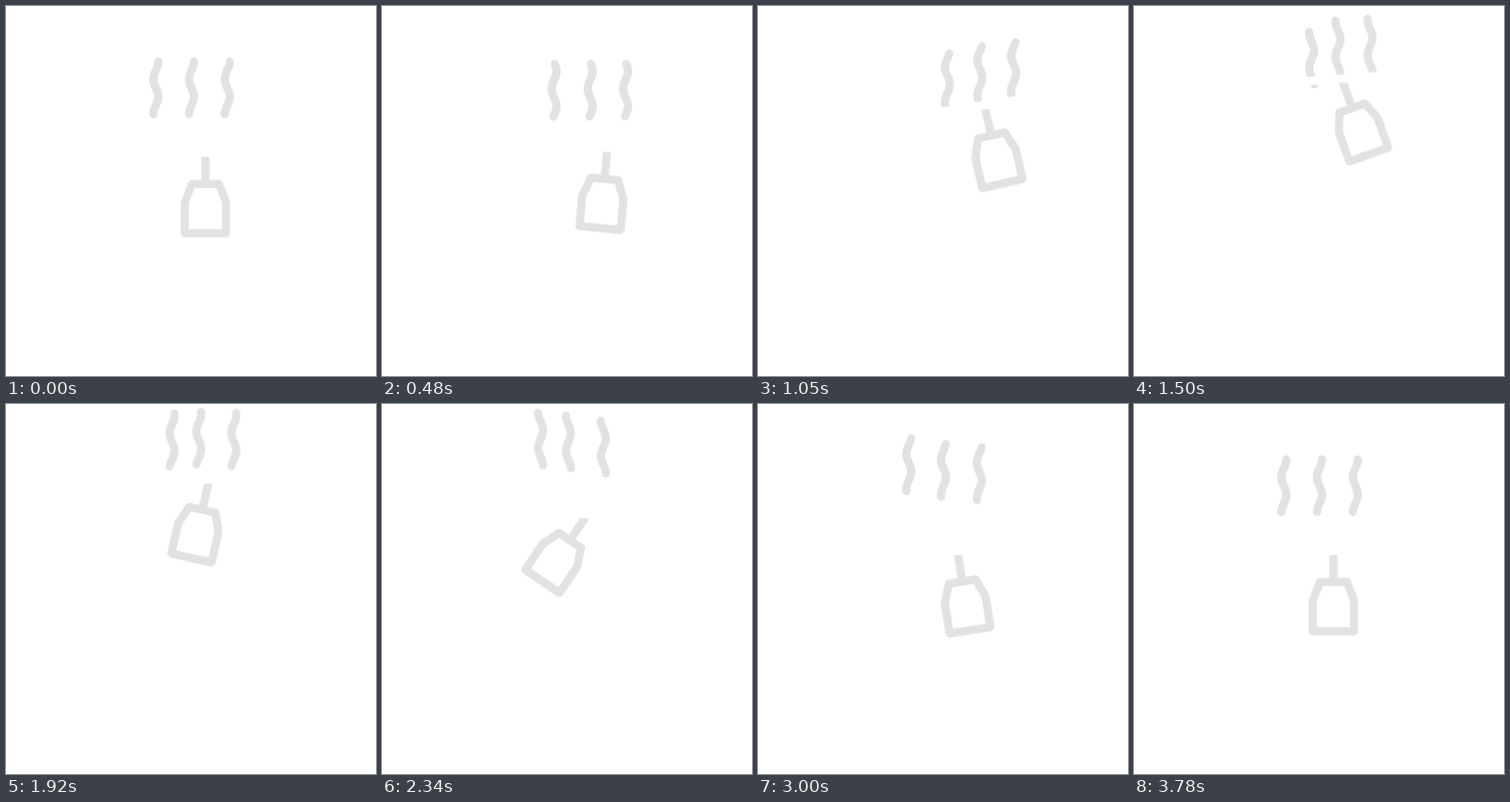
These frames come from a looping animation (400x400 px, 5.87 s). An HTML page without scripts:

```html
<!DOCTYPE html>
<html lang="en">
<head>
<meta charset="utf-8">
<title>Tea</title>
<style>
html, body { margin: 0; width: 100%; height: 100%; overflow: hidden; background: #fff; }
svg { display: block; width: 100%; height: 100%; fill: none; stroke: #e2e2e2; stroke-width: 8.8; stroke-linejoin: round; }
svg [class] { animation: 5.87s ease-in-out infinite; }
use { stroke-linecap: round; stroke-dasharray: 57 400; stroke-dashoffset: -114; }

svg .wave { animation-name: wave; }
svg .x1 { animation-name: x1; }
svg .y1 { animation-name: y1; }
svg .x2 { animation-name: x2; }
svg .y2 { animation-name: y2; }
svg .x3 { animation-name: x3; }
svg .y3 { animation-name: y3; }
svg .cup-x { animation-name: cup-x; }
svg .cup-y { animation-name: cup-y; }
svg .swing { animation-name: swing; }
svg .tilt { animation-name: tilt; }

/* the ripple runs three periods while the visible dash stays in place */
@keyframes wave {
  0%, 1.02% { transform: translateY(0); stroke-dashoffset: -114; animation-timing-function: cubic-bezier(.33,0,.67,.37); }
  8.18% { transform: translateY(8px); stroke-dashoffset: -106; animation-timing-function: cubic-bezier(.33,.26,.67,.63); }
  17.89% { transform: translateY(34px); stroke-dashoffset: -80; animation-timing-function: linear; }
  25.55% { transform: translateY(58px); stroke-dashoffset: -56; animation-timing-function: cubic-bezier(.33,.39,.67,.73); }
  39.86% { transform: translateY(95px); stroke-dashoffset: -19; animation-timing-function: cubic-bezier(.33,.47,.67,.87); }
  51.11% { transform: translateY(112px); stroke-dashoffset: -2; animation-timing-function: cubic-bezier(.33,1,.67,1); }
  61.33%, 100% { transform: translateY(114px); stroke-dashoffset: 0; }
}

/* left steam */
@keyframes x1 {
  0%, 1.02% { transform: translateX(0); animation-timing-function: cubic-bezier(.33,0,.67,.62); }
  8.18% { transform: translateX(24px); animation-timing-function: cubic-bezier(.33,.53,.67,1); }
  16.18% { transform: translateX(43.5px); animation-timing-function: cubic-bezier(.33,0,.67,.61); }
  25.55% { transform: translateX(30px); animation-timing-function: linear; }
  31.18% { transform: translateX(20px); animation-timing-function: cubic-bezier(.33,.47,.67,.72); }
  39.86% { transform: translateX(9.5px); animation-timing-function: cubic-bezier(.33,.44,.67,.9); }
  51.11% { transform: translateX(1px); animation-timing-function: ease-out; }
  61.33%, 100% { transform: translateX(0); }
}
@keyframes y1 {
  0%, 1.02% { transform: translateY(0); }
  8.86% { transform: translateY(2.6px); animation-timing-function: cubic-bezier(.33,0,.67,.27); }
  17.89% { transform: translateY(-9px); animation-timing-function: linear; }
  25.55% { transform: translateY(-32px); animation-timing-function: cubic-bezier(.33,.5,.67,1); }
  36.63% { transform: translateY(-53px); animation-timing-function: cubic-bezier(.33,0,.67,.34); }
  39.86% { transform: translateY(-50.5px); animation-timing-function: cubic-bezier(.33,.21,.67,.57); }
  51.11% { transform: translateY(-23px); animation-timing-function: cubic-bezier(.33,.47,.67,1); }
  61.33%, 100% { transform: translateY(0); }
}

/* middle steam */
@keyframes x2 {
  0%, 1.02% { transform: translateX(0); animation-timing-function: cubic-bezier(.33,0,.67,.61); }
  8.18% { transform: translateX(24.5px); animation-timing-function: cubic-bezier(.33,.52,.67,1); }
  14.99% { transform: translateX(42px); animation-timing-function: cubic-bezier(.33,0,.67,.62); }
  25.55% { transform: translateX(20px); animation-timing-function: cubic-bezier(.33,.44,.67,.73); }
  31.18% { transform: translateX(10px); animation-timing-function: cubic-bezier(.33,.45,.67,.85); }
  39.86% { transform: translateX(1px); animation-timing-function: ease-out; }
  46%, 100% { transform: translateX(0); }
}
@keyframes y2 {
  0%, 1.02% { transform: translateY(0); }
  7.84% { transform: translateY(2.5px); animation-timing-function: cubic-bezier(.33,0,.67,.3); }
  17.89% { transform: translateY(-16.5px); animation-timing-function: cubic-bezier(.33,.37,.67,.78); }
  25.55% { transform: translateY(-44px); animation-timing-function: cubic-bezier(.33,.62,.67,1); }
  31.52% { transform: translateY(-51.5px); animation-timing-function: cubic-bezier(.33,0,.67,.11); }
  39.86% { transform: translateY(-47.5px); animation-timing-function: cubic-bezier(.33,.16,.67,.67); }
  51.11% { transform: translateY(-17px); animation-timing-function: cubic-bezier(.33,.54,.67,1); }
  61.33%, 100% { transform: translateY(0); }
}

/* right steam */
@keyframes x3 {
  0%, 1.02% { transform: translateX(0); animation-timing-function: cubic-bezier(.33,0,.67,.58); }
  8.18% { transform: translateX(24px); animation-timing-function: cubic-bezier(.33,.48,.67,1); }
  14.31% { transform: translateX(41.5px); animation-timing-function: cubic-bezier(.33,0,.67,.66); }
  25.55% { transform: translateX(16px); animation-timing-function: cubic-bezier(.33,.6,.67,.7); }
  31.18% { transform: translateX(9px); animation-timing-function: cubic-bezier(.33,.36,.67,.94); }
  39.86%, 100% { transform: translateX(0); }
}
@keyframes y3 {
  0%, 1.02% { transform: translateY(0); }
  7.67% { transform: translateY(2.5px); animation-timing-function: cubic-bezier(.33,0,.67,.34); }
  17.89% { transform: translateY(-21px); animation-timing-function: cubic-bezier(.33,.47,.67,.82); }
  25.55% { transform: translateY(-46px); animation-timing-function: cubic-bezier(.33,.56,.67,1); }
  29.81% { transform: translateY(-50.5px); animation-timing-function: cubic-bezier(.33,0,.67,.26); }
  39.86% { transform: translateY(-42px); animation-timing-function: cubic-bezier(.33,.25,.67,.72); }
  51.11% { transform: translateY(-13.5px); animation-timing-function: cubic-bezier(.33,.53,.67,1); }
  61.33%, 100% { transform: translateY(0); }
}

/* cup and tea tag */
@keyframes cup-x {
  0%, 1.02% { transform: translateX(0); animation-timing-function: cubic-bezier(.33,0,.67,.69); }
  8.18% { transform: translateX(28px); animation-timing-function: cubic-bezier(.33,.62,.67,1); }
  13.29% { transform: translateX(38px); animation-timing-function: cubic-bezier(.33,0,.67,.57); }
  17.89% { transform: translateX(29px); animation-timing-function: cubic-bezier(.33,.32,.67,.76); }
  25.55% { transform: translateX(9px); animation-timing-function: cubic-bezier(.33,.75,.67,1); }
  31.52% { transform: translateX(4px); }
  39.86% { transform: translateX(6.4px); }
  49.4%, 100% { transform: translateX(0); }
}
@keyframes cup-y {
  0%, 1.02% { transform: translateY(0); animation-timing-function: cubic-bezier(.33,0,.67,.08); }
  8.18% { transform: translateY(-5.3px); animation-timing-function: cubic-bezier(.33,.14,.67,.65); }
  17.89% { transform: translateY(-51.4px); animation-timing-function: cubic-bezier(.33,.45,.67,.78); }
  25.55% { transform: translateY(-80px); animation-timing-function: cubic-bezier(.33,.7,.67,1); }
  28.96% { transform: translateY(-84px); animation-timing-function: cubic-bezier(.33,0,.67,.48); }
  39.86% { transform: translateY(-39.3px); animation-timing-function: cubic-bezier(.33,.48,.67,1); }
  48.55%, 100% { transform: translateY(0); }
}
@keyframes swing {
  0%, 1.02% { transform: rotate(0deg); }
  5.96% { transform: rotate(6.5deg); animation-timing-function: cubic-bezier(.33,0,.67,.33); }
  8.18% { transform: rotate(5.2deg); animation-timing-function: cubic-bezier(.33,.21,.67,.53); }
  17.89% { transform: rotate(-13.1deg); animation-timing-function: cubic-bezier(.33,.49,.67,1); }
  23% { transform: rotate(-22.3deg); animation-timing-function: cubic-bezier(.33,0,.67,.23); }
  25.55% { transform: rotate(-19.7deg); animation-timing-function: cubic-bezier(.33,.2,.67,1); }
  39.35% { transform: rotate(34.2deg); animation-timing-function: cubic-bezier(.33,0,.67,1); }
  51.28% { transform: rotate(-9deg); }
  60.65% { transform: rotate(1.6deg); }
  64.4%, 100% { transform: rotate(0deg); }
}
@keyframes tilt {
  0%, 1.02% { transform: rotate(0deg); }
  8.18% { transform: rotate(5deg); }
  17.89% { transform: rotate(-8.7deg); }
  25.55% { transform: rotate(-4deg); }
  39.86% { transform: rotate(10deg); }
  49.4%, 100% { transform: rotate(0deg); }
}
</style>
</head>
<body>
<svg viewBox="0 0 400 400">
  <defs>
    <path id="ripple" pathLength="171" d="M164.7-54c0 8-5.4 11-5.4 19s5.4 11 5.4 19-5.4 11-5.4 19 5.4 11 5.4 19-5.4 11-5.4 19 5.4 11 5.4 19-5.4 11-5.4 19 5.4 11 5.4 19-5.4 11-5.4 19"/>
  </defs>
  <g class="x1"><g class="y1"><use class="wave" href="#ripple"/></g></g>
  <g class="x2"><g class="y2"><use class="wave" href="#ripple" x="38.5"/></g></g>
  <g class="x3"><g class="y3"><use class="wave" href="#ripple" x="77.2"/></g></g>
  <g transform="translate(215.6 158.7)">
    <g class="cup-x"><g class="cup-y">
      <path class="swing" d="M0 0V31M-22.3 87V53.5L-14.6 33.7H14.6L22.3 53.5V87Z"/>
      <path class="tilt" stroke="#fff" d="M-75 0H48"/>
    </g></g>
  </g>
</svg>
</body>
</html>
```
